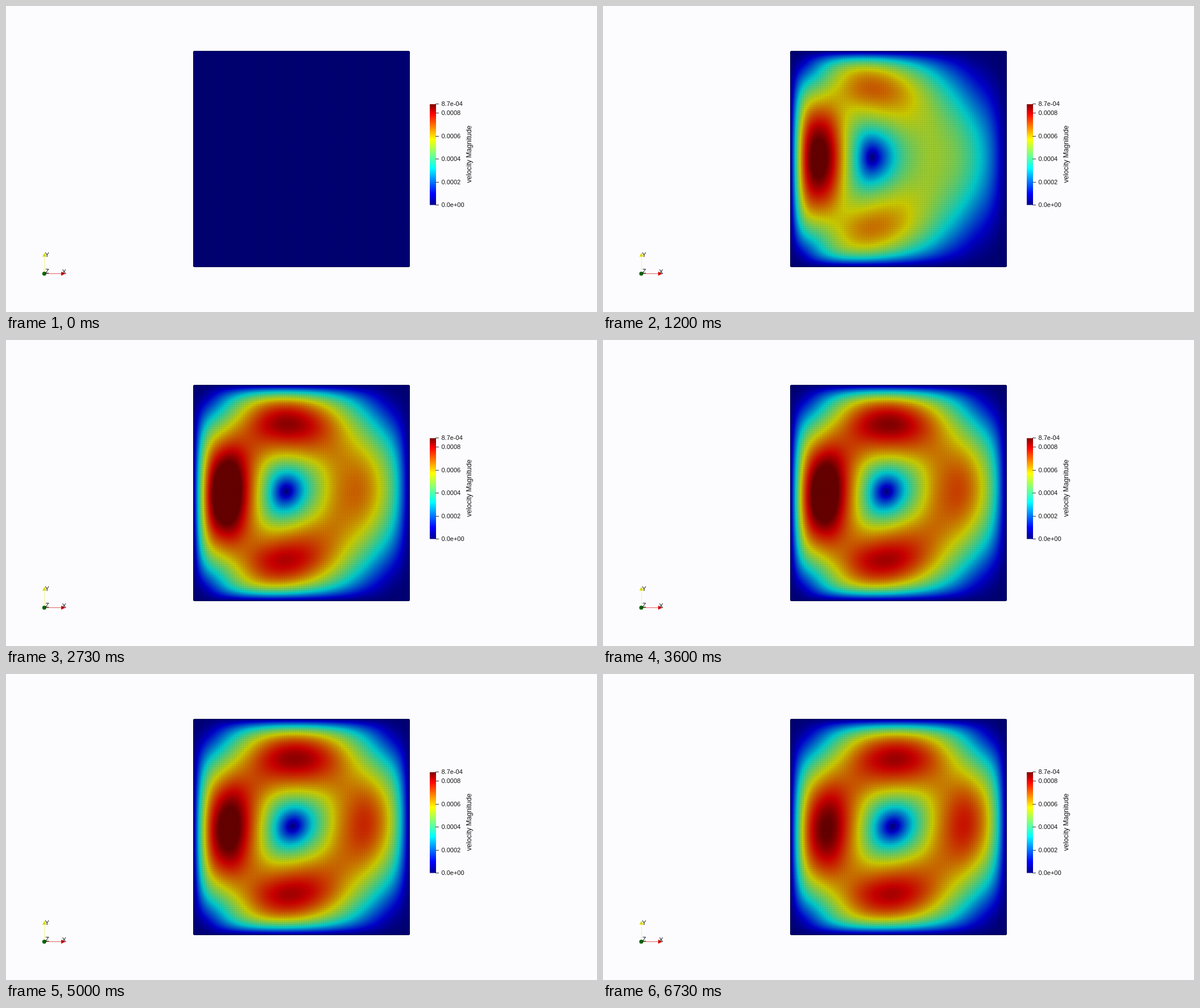
An HTML page with a canvas that plays this animation: 1039 px wide and 539 px high, repeating every 6.79 s.

```html
<!DOCTYPE html>
<html lang="en">
<head>
<meta charset="utf-8">
<title>Heated cavity flow</title>
<style>
html, body { margin: 0; width: 100%; height: 100%; overflow: hidden; background: #fcfcfe; }
canvas { display: block; width: 1039px; height: 539px; }
</style>
</head>
<body>
<canvas id="stage" width="1039" height="539"></canvas>
<script>
const ctx = document.getElementById('stage').getContext('2d');
const LOOP = 6790, FRAMES = 102, FRAME_MS = 200 / 3;
const LEFT = 329, TOP = 79, SIZE = 381;

// Buoyant flow in a square cavity, hot left wall and cold right wall:
// slow viscous stream function in clamped modes, temperature on a grid.
const RA = 1000, DIFFUSION = 0.0245, N = 48, M = 14, MM = M * M;
const STEPS = 20;
const DT = DIFFUSION * FRAME_MS / 1000 / STEPS;

// Clamped modes with first and second derivatives at n cell centres.
function makeBasis(n) {
  const out = [[], [], []];
  for (let k = 1; k <= M; k++) {
    const p = (k - 1) * Math.PI, q = (k + 1) * Math.PI;
    const rows = out.map(list => (list.push(new Float64Array(n)), list[k - 1]));
    for (let i = 0; i < n; i++) {
      const x = (i + 0.5) / n;
      rows[0][i] = Math.cos(p * x) - Math.cos(q * x);
      rows[1][i] = q * Math.sin(q * x) - p * Math.sin(p * x);
      rows[2][i] = q * q * Math.cos(q * x) - p * p * Math.cos(p * x);
    }
  }
  return out;
}

const dot = (a, b) => {
  let s = 0;
  for (let i = 0; i < a.length; i++) s += a[i] * b[i];
  return s;
};

function invert(a) {
  const n = a.length;
  for (let p = 0; p < n; p++) {
    const row = a[p], d = 1 / row[p];
    row[p] = 1;
    for (let j = 0; j < n; j++) row[j] *= d;
    for (let i = 0; i < n; i++) {
      if (i === p) continue;
      const r = a[i], f = r[p];
      if (f === 0) continue;
      r[p] = 0;
      for (let j = 0; j < n; j++) r[j] -= f * row[j];
    }
  }
  return a;
}

function biharmonicInverse(basis) {
  const [m0, m1, m2] = basis.map(b => b.map(f => b.map(g => dot(f, g) / N)));
  const a = [];
  for (let i = 0; i < M; i++) for (let j = 0; j < M; j++) {
    const row = new Float64Array(MM);
    for (let k = 0; k < M; k++) for (let l = 0; l < M; l++) {
      row[k * M + l] = m2[i][k] * m0[j][l] + 2 * m1[i][k] * m1[j][l] + m0[i][k] * m2[j][l];
    }
    a.push(row);
  }
  return invert(a);
}

// Velocity on an n by n grid from mode coefficients, y upwards.
function velocity(c, basis, n, u, v) {
  u.fill(0);
  v.fill(0);
  const g = new Float64Array(n), h = new Float64Array(n);
  for (let j = 0; j < M; j++) {
    g.fill(0);
    h.fill(0);
    for (let i = 0; i < M; i++) {
      const w = c[i * M + j], b = basis[0][i], d = basis[1][i];
      for (let x = 0; x < n; x++) {
        g[x] += w * b[x];
        h[x] += w * d[x];
      }
    }
    for (let y = 0, o = 0; y < n; y++) {
      const b = basis[0][j][y], d = basis[1][j][y];
      for (let x = 0; x < n; x++, o++) {
        u[o] += d * g[x];
        v[o] -= b * h[x];
      }
    }
  }
}

function simulate() {
  const basis = makeBasis(N), inverse = biharmonicInverse(basis);
  const u = new Float64Array(N * N), v = new Float64Array(N * N);
  let T = new Float64Array(N * N), next = new Float64Array(N * N);

  const solve = () => {
    const load = new Float64Array(MM);
    for (let i = 0; i < M; i++) {
      const row = new Float64Array(N);
      for (let y = 0; y < N; y++) row[y] = dot(T.subarray(y * N, y * N + N), basis[1][i]);
      for (let j = 0; j < M; j++) load[i * M + j] = -RA * dot(row, basis[0][j]) / (N * N);
    }
    return Float64Array.from(inverse, r => dot(r, load));
  };

  const step = () => {
    const k = N * N, half = N / 2;
    for (let y = 0, o = 0; y < N; y++) for (let x = 0; x < N; x++, o++) {
      const t = T[o];
      const w = x > 0 ? T[o - 1] : 2 - t;
      const e = x < N - 1 ? T[o + 1] : -t;
      const s = y > 0 ? T[o - N] : t;
      const n = y < N - 1 ? T[o + N] : t;
      next[o] = t + DT * (k * (w + e + s + n - 4 * t) - half * (u[o] * (e - w) + v[o] * (n - s)));
    }
    [T, next] = [next, T];
  };

  const flows = [];
  for (let f = 0; f < FRAMES; f++) {
    const c = solve();
    flows.push(c);
    velocity(c, basis, N, u, v);
    for (let s = 0; s < STEPS; s++) {
      if (s === STEPS / 2) velocity(solve(), basis, N, u, v);
      step();
    }
  }
  return flows;
}

const STOPS = [
  [0, 0, 0, 0.5625], [0.1111, 0, 0, 1], [0.3651, 0, 1, 1], [0.5079, 0.5, 1, 0.5],
  [0.6508, 1, 1, 0], [0.9048, 1, 0, 0], [1, 0.5, 0, 0]
];

function rainbow(s) {
  let i = 1;
  while (i < STOPS.length - 1 && s > STOPS[i][0]) i++;
  const a = STOPS[i - 1], b = STOPS[i], f = (s - a[0]) / (b[0] - a[0]);
  return [1, 2, 3].map(k => 255 * (a[k] + f * (b[k] - a[k])));
}

const LUT_MAX = 1023;
const lut = new Float32Array((LUT_MAX + 1) * 3);
for (let i = 0; i <= LUT_MAX; i++) lut.set(rainbow(i / LUT_MAX), i * 3);

// Fine mesh lines darken the surface slightly.
const mesh = Float32Array.from({ length: SIZE }, (_, i) => 0.015 * Math.cos(2 * Math.PI * i / 3.81));
const edge = i => i === 0 || i === SIZE - 1;

const flows = simulate();
const basis = makeBasis(SIZE);
const U = new Float64Array(SIZE * SIZE), V = new Float64Array(SIZE * SIZE);
const image = ctx.createImageData(SIZE, SIZE);

velocity(flows[FRAMES - 1], basis, SIZE, U, V);
let peak = 0;
for (let o = 0; o < U.length; o++) peak = Math.max(peak, Math.hypot(U[o], V[o]));
const GAIN = 1.01 / peak;

function drawField(index) {
  const px = image.data;
  if (index) velocity(flows[index], basis, SIZE, U, V);
  else { U.fill(0); V.fill(0); }
  for (let r = 0, p = 0; r < SIZE; r++) {
    let o = (SIZE - 1 - r) * SIZE;
    for (let x = 0; x < SIZE; x++, o++, p += 4) {
      const speed = Math.min(1, GAIN * Math.sqrt(U[o] * U[o] + V[o] * V[o]));
      const c = 3 * Math.round(speed * LUT_MAX);
      const shade = edge(r) || edge(x) ? 0.55 : 0.775 - mesh[r] - mesh[x];
      px[p] = lut[c] * shade;
      px[p + 1] = lut[c + 1] * shade;
      px[p + 2] = lut[c + 2] * shade;
      px[p + 3] = 255;
    }
  }
  ctx.putImageData(image, LEFT, TOP);
  ctx.fillStyle = '#fcfcfe';
  for (const x of [LEFT, LEFT + SIZE - 1]) for (const y of [TOP, TOP + SIZE - 1]) ctx.fillRect(x, y, 1, 1);
}

function line(x1, y1, x2, y2, color) {
  ctx.strokeStyle = color;
  ctx.beginPath();
  ctx.moveTo(x1, y1);
  ctx.lineTo(x2, y2);
  ctx.stroke();
}

function triangle(points, color) {
  ctx.fillStyle = color;
  ctx.beginPath();
  points.forEach(([x, y]) => ctx.lineTo(x, y));
  ctx.fill();
}

function text(s, x, y, size) {
  ctx.font = size + 'px "Liberation Sans", Arial, sans-serif';
  ctx.fillStyle = '#111';
  ctx.fillText(s, x, y);
}

function drawLegend() {
  const top = 173, bottom = 350.5;
  const ramp = ctx.createLinearGradient(0, bottom, 0, top);
  for (const s of STOPS) ramp.addColorStop(s[0], `rgb(${rainbow(s[0]).map(Math.round)})`);
  ctx.fillStyle = ramp;
  ctx.fillRect(745, top, 11, bottom - top);
  const labels = [['8.7e-04', 172.5], ['0.0008', 188.5], ['0.0006', 229.5],
    ['0.0004', 269.5], ['0.0002', 310.5], ['0.0e+00', 350.5]];
  for (const [s, y] of labels) {
    line(755, y, 761, y, '#333');
    text(s, 765.5, y + 3.5, 11);
  }
  ctx.save();
  ctx.translate(818, 311.5);
  ctx.rotate(-Math.PI / 2);
  text('velocity Magnitude', 0, 0, 12.2);
  ctx.restore();
}

function drawAxes() {
  line(67.5, 471, 67.5, 441, '#f4f48c');
  line(67, 471.5, 98, 471.5, '#e06060');
  triangle([[67.5, 434.5], [71, 441.5], [64, 441.5]], '#d8d800');
  triangle([[104.5, 471.5], [97, 468], [97, 475]], '#dc0000');
  ctx.fillStyle = '#006400';
  ctx.beginPath();
  ctx.arc(67.3, 471.5, 3.5, 0, 2 * Math.PI);
  ctx.fill();
  text('Y', 68.5, 442, 11);
  text('X', 98.5, 472, 11);
  text('Z', 69, 471, 11);
}

ctx.fillStyle = '#fcfcfe';
ctx.fillRect(0, 0, 1039, 539);
drawLegend();
drawAxes();

let shown = -1;
const start = performance.now();
function tick() {
  const t = (performance.now() - start) % LOOP;
  const index = Math.min(FRAMES - 1, Math.floor((Math.floor(t / 10) * 10 + 4.9) / FRAME_MS));
  if (index !== shown) drawField(shown = index);
  requestAnimationFrame(tick);
}
tick();
</script>
</body>
</html>
```
